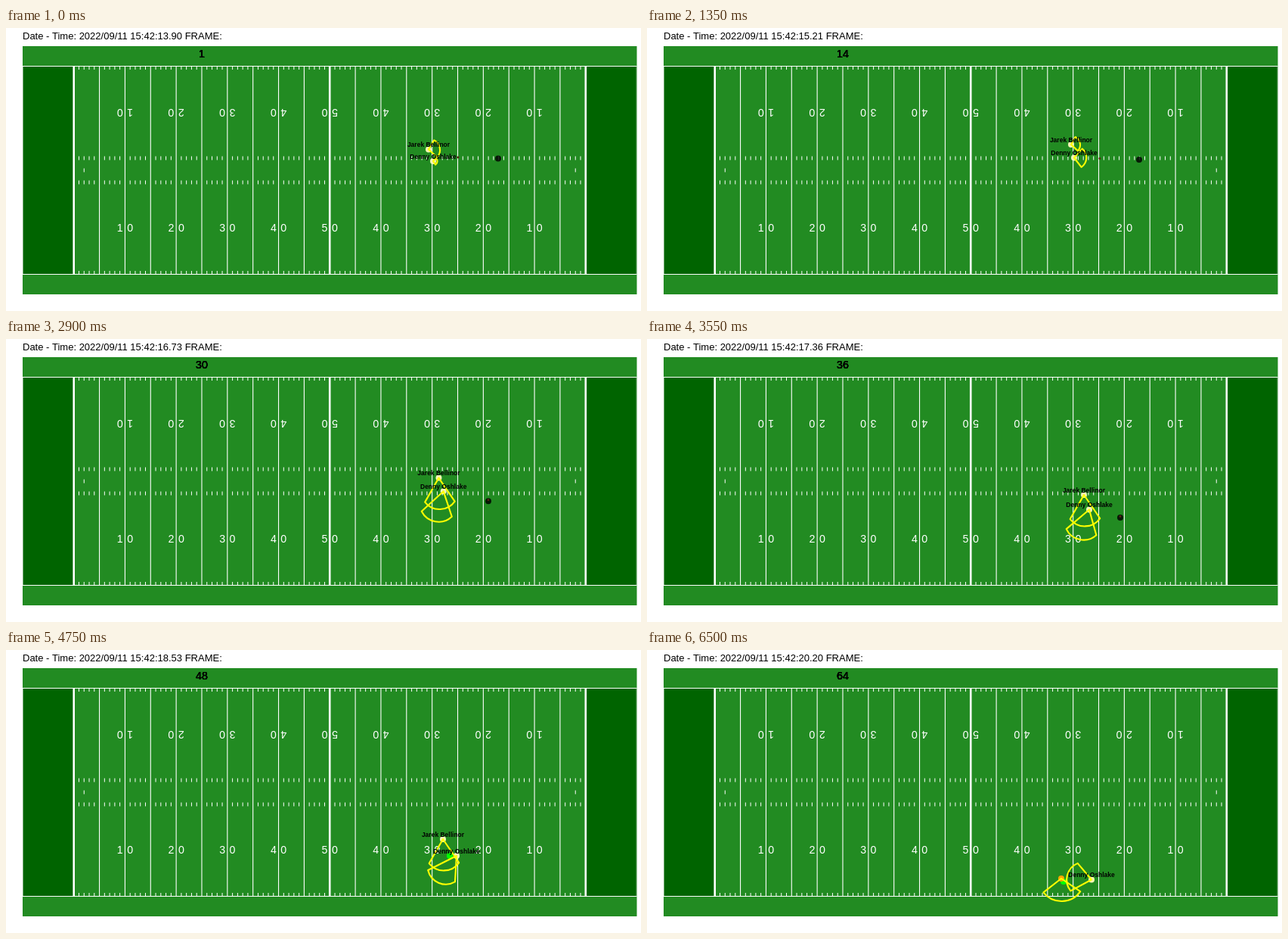
An HTML page with a canvas that plays this animation: 840x374 px, repeating every 8000 ms.

```html
<!DOCTYPE html>
<html lang="en">
<head>
<meta charset="utf-8">
<title>Linebacker pursuit</title>
<style>
  html, body { margin: 0; width: 100%; height: 100%; overflow: hidden; background: #fff; }
  canvas { display: block; }
</style>
</head>
<body>
<canvas id="stage" width="840" height="374"></canvas>
<script>
const ctx = document.getElementById('stage').getContext('2d');
const FONT = '"Liberation Sans", Arial, sans-serif';
const LOOP = 8000, STEP = 50, LAST = 129, ROWS = 64;

// Panel and field edges in pixels, and the size of a yard each way.
const LEFT = 22, RIGHT = 834.5, TOP = 50.5, BOTTOM = 325.5, MIDDLE = 188;
const YARD_X = (RIGHT - LEFT) / 120, YARD_Y = 5.14;
const yardX = yard => LEFT + (yard + 10) * YARD_X;

// Smooth step from 0 to 1 between two times.
function ease(time, from, to) {
  const u = Math.min(1, Math.max(0, (time - from) / (to - from)));
  return u * u * (3 - 2 * u);
}

// Smooth curve through a few waypoints at shared times.
const TIMES = [0, 1350, 2250, 3550, 4750, 5500, 6450];
function along(values, time) {
  const end = TIMES.length - 1;
  const n = Math.min(end - 1, TIMES.findLastIndex(t => t <= time));
  const span = TIMES[n + 1] - TIMES[n];
  const u = (time - TIMES[n]) / span, v = 1 - u;
  const slope = k => {
    const a = Math.max(0, k - 1), b = Math.min(end, k + 1);
    return (values[b] - values[a]) / (TIMES[b] - TIMES[a]);
  };
  return values[n] * v * v * (1 + 2 * u) + values[n + 1] * u * u * (1 + 2 * v)
    + span * u * v * (slope(n) * v - slope(n + 1) * u);
}

// Reach is in yards, heading in degrees clockwise from the right.
const defenders = [
  {
    name: 'Jarek Bellinor', tackles: true,
    x: [559, 561, 566, 578, 578, 565, 548],
    y: [160.5, 154, 164.5, 206, 250, 278, 302],
    reach: t => 2.6 - 0.5 * ease(t, 0, 1350) + 4.7 * ease(t, 1350, 2600)
      - 1.8 * ease(t, 5900, 6450),
    heading: t => -8 + 96 * ease(t, 1400, 2900)
  },
  {
    name: 'Denny Oshlake',
    x: [565, 565, 572.5, 585, 596, 594.5, 588],
    y: [176, 171.5, 181, 225.5, 272, 293, 303.5],
    reach: t => 1 + 1.8 * ease(t, 0, 800) + 3.9 * ease(t, 1350, 2600)
      - 1.7 * ease(t, 4750, 6450),
    heading: t => 2 + 103 * ease(t, 1350, 3050) + 86 * ease(t, 4450, 5600)
  }
];
const runner = {
  x: [651, 651, 646, 626, 587, 569, 551],
  y: [172.5, 174, 193.5, 236, 272, 288, 306]
};

function rect(x1, y1, x2, y2, color) {
  ctx.fillStyle = color;
  ctx.fillRect(x1, y1, x2 - x1, y2 - y1);
}

function line(x1, y1, x2, y2, width) {
  ctx.strokeStyle = '#fff';
  ctx.lineWidth = width;
  ctx.beginPath();
  ctx.moveTo(x1, y1);
  ctx.lineTo(x2, y2);
  ctx.stroke();
}

function dot(x, y, radius, color) {
  ctx.fillStyle = color;
  ctx.beginPath();
  ctx.arc(x, y, radius, 0, Math.PI * 2);
  ctx.fill();
}

function text(string, x, y, font, color = '#000', align = 'center') {
  ctx.font = `${font} ${FONT}`;
  ctx.fillStyle = color;
  ctx.textAlign = align;
  ctx.fillText(string, x, y);
}

function yardNumber(yard, y, angle) {
  ctx.save();
  ctx.translate(yardX(yard), y);
  ctx.rotate(angle);
  text(Math.min(yard, 100 - yard) / 10, -6.7, 5, '14.2px', '#fff');
  text(0, 6.7, 5, '14.2px', '#fff');
  ctx.restore();
}

function drawField() {
  rect(0, 0, 840, 374, '#fff');
  rect(LEFT, 24, RIGHT, 352, '#228b22');
  rect(LEFT, TOP, yardX(0), BOTTOM, '#006400');
  rect(yardX(100), TOP, RIGHT, BOTTOM, '#006400');
  for (const y of [TOP, BOTTOM]) line(LEFT, y, RIGHT, y, 1.1);
  for (const x of [LEFT + 0.3, RIGHT - 0.3]) line(x, TOP, x, BOTTOM, 0.6);

  for (let yard = 0; yard <= 100; yard++) {
    const x = yardX(yard);
    const tick = y => line(x, y - 2.5, x, y + 2.5, 1);
    if (yard % 5 === 0) line(x, TOP, x, BOTTOM, yard % 50 ? 1.1 : 2.6);
    else [TOP + 2, MIDDLE - 16, MIDDLE + 16, BOTTOM - 2].forEach(tick);
    if (yard === 2 || yard === 98) tick(MIDDLE);
    if (yard % 10 === 0 && yard % 100) {
      yardNumber(yard, MIDDLE + 76, 0);
      yardNumber(yard, MIDDLE - 76, Math.PI);
    }
  }
}

// A wedge that narrows as its reach grows, closed by a shallow arc.
function drawSight(x, y, reach, heading) {
  const spread = 60 - 0.11 * reach ** 3;
  const [[x1, y1], [x2, y2]] = [heading - spread, heading + spread].map(degrees => {
    const angle = degrees * Math.PI / 180;
    return [x + reach * YARD_X * Math.cos(angle), y + reach * YARD_Y * Math.sin(angle)];
  });
  const radius = 0.625 * Math.hypot(x2 - x1, y2 - y1);
  ctx.strokeStyle = '#ff0';
  ctx.lineWidth = 2.1;
  ctx.lineJoin = 'round';
  ctx.stroke(new Path2D(
    `M${x} ${y}L${x1} ${y1}A${radius} ${radius} 0 0 1 ${x2} ${y2}Z`));
}

function drawRunner(time) {
  const x = along(runner.x, time), y = along(runner.y, time);
  const inSight = time >= 4250;
  dot(x, y, 4, inSight ? '#0f0' : 'rgba(0,0,0,.82)');
  if (!inSight) dot(x - 53 * (1 - ease(time, 1250, 2550)), y - 1.5, 1.4, '#5a2412');
}

function drawDefenders(time, tackled) {
  const players = defenders.map(d => ({
    ...d, x: along(d.x, time), y: along(d.y, time), done: d.tackles && tackled
  }));
  for (const p of players) dot(p.x, p.y, 4, p.done ? '#ffa500' : '#f3f5b5');
  for (const p of players) drawSight(p.x, p.y, p.reach(time), p.heading(time));
  for (const p of players) if (!p.done) text(p.name, p.x, p.y - 3.5, 'bold 8.5px');
}

function draw(now) {
  const tick = Math.min(LAST, Math.floor((now % LOOP) / STEP));
  const time = tick * STEP;
  const row = Math.min(ROWS, 1 + Math.floor((tick + 1.5) * (ROWS - 1) / LAST));
  const seconds = Math.floor(1390 + tick * 630 / LAST + 1e-6) / 100;

  drawField();
  text(`Date - Time: 2022/09/11 15:42:${seconds.toFixed(2)} FRAME:`,
    LEFT, 15, '13px', '#000', 'left');
  // Stacked copies thicken the glyph edges.
  for (let i = 0; i < 6; i++) text(row, 259, 39, '14.2px');
  drawRunner(time);
  drawDefenders(time, tick >= LAST - 1);
}

const start = performance.now();
function animate() {
  draw(performance.now() - start);
  requestAnimationFrame(animate);
}
animate();
</script>
</body>
</html>
```
